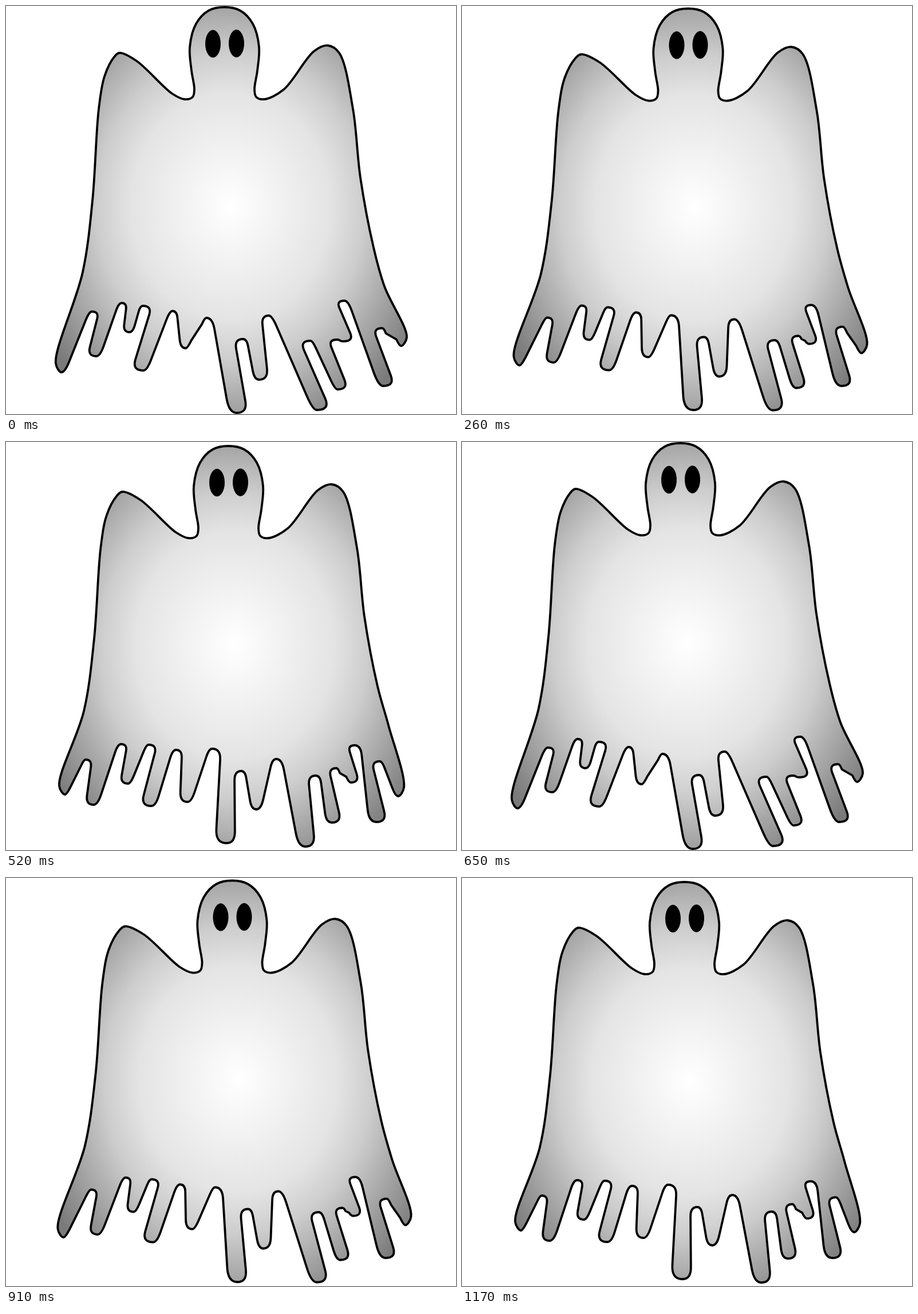
An HTML page with a canvas for the animation above (1.3 s loop, 786 by 713 pixels).

```html
<!DOCTYPE html>
<html lang="en">
<head>
<meta charset="utf-8">
<title>Ghost</title>
<style>
html, body { margin: 0; overflow: hidden; background: #fff; }
canvas { display: block; }
</style>
</head>
<body>
<canvas id="stage" width="786" height="713"></canvas>
<script>
const ctx = document.getElementById("stage").getContext("2d");
const STEP = 130, POSES = 5;
const pairs = text => text.trim().split(/\s+/).map(p => p.split(",").map(Number));

// Upper outline, clockwise; the head is mirrored about its middle
const left = pairs("134,465 151,340 162,180 172,123 189,89 198,82 228,96 290,153");
const halfHead = pairs("312,163 326,159 329,146 324,113 321,72 332,31 354,8");
const right = pairs("485,146 538,79 562,69 582,82 606,180 619,300 642,422 661,490");
const mirrored = halfHead.map(([x, y]) => [763 - x, y]).reverse();
const upper = [...left, ...halfHead, [381.5, 2], ...mirrored, ...right];
const eyes = [[361.5, 66], [402.5, 65.5]];
const core = [392, 350];

// Hem from right to left: drip tips and the gaps between them, at both ends of the sway
const hemStart = pairs(`690,594 657,563 659,664 591,515 590,586 578,583 579,670 532,585
  543,706 459,541 442,653 414,582 403,711 350,545 314,598 291,533 240,637 239,524
  216,570 202,519 158,612 150,534 97,640`);
const hemEnd = pairs(`685,619 653,558 647,664 609,530 602,595 577,570 569,665 541,583
  523,707 472,554 437,642 411,575 385,701 360,536 317,629 297,538 254,636 249,529
  213,597 201,528 153,634 139,555 103,616`);

// Bezier handle at b, pointing towards c, on a centripetal spline a-b-c
function handle(a, b, c) {
  const m = Math.hypot(b[0] - a[0], b[1] - a[1]);
  const n = Math.hypot(c[0] - b[0], c[1] - b[1]);
  const r = Math.sqrt(m * n);
  return b.map((v, k) => (m * c[k] - n * a[k] + (2 * m + 3 * r + n) * v) / (3 * (m + r)));
}

// Smooth curve through all but the first and last point, which only steer it
function spline(p) {
  ctx.moveTo(...p[1]);
  for (let i = 1; i < p.length - 2; i++) {
    ctx.bezierCurveTo(...handle(p[i - 1], p[i], p[i + 1]),
      ...handle(p[i + 2], p[i + 1], p[i]), ...p[i + 1]);
  }
}

// Where the rounded end at p meets the straight edge towards q
function shoulder(p, q, side) {
  const dy = q[1] - p[1], length = Math.abs(dy);
  const radius = (6 + 0.07 * length) * (dy < 0 ? 1 : 0.8);
  return [p[0] + side * radius, p[1] + Math.sign(dy) * Math.min(1.4 * radius, 0.4 * length)];
}

function edge(p, q) {
  const a = shoulder(p, q, -1), b = shoulder(q, p, 1);
  const xAt = y => a[0] + (b[0] - a[0]) * (y - a[1]) / (b[1] - a[1]);
  ctx.quadraticCurveTo(Math.min(xAt(p[1]), p[0] - 3), p[1], ...a);
  ctx.lineTo(...b);
  ctx.quadraticCurveTo(Math.max(xAt(q[1]), q[0] + 3), q[1], ...q);
}

function outline(top, hem) {
  const first = hem[0], last = hem[hem.length - 1];
  const beside = ([x, y], dx) => [x + dx, y - 15];
  ctx.beginPath();
  spline([beside(last, 10), last, beside(last, -10), ...top,
    beside(first, 10), first, beside(first, -10)]);
  for (let i = 1; i < hem.length; i++) edge(hem[i - 1], hem[i]);
  ctx.closePath();
}

function draw(w) {
  // The body swings out and back, held at its left tip
  const swing = 40 * w * (1 - w);
  const loose = x => Math.max(0, Math.min(1, (x - 90) / 150));
  const shift = ([x, y]) => [x + loose(x) * (7 * w + swing), y + 5 * w];
  const hem = hemStart.map(([x, y], i) => [
    x + (hemEnd[i][0] - x) * w + loose(x) * swing,
    y + (hemEnd[i][1] - y) * w]);

  ctx.fillStyle = "#fff";
  ctx.fillRect(0, 0, 786, 713);
  outline(upper.map(shift), hem);

  const glow = ctx.createRadialGradient(0, 0, 0, 0, 0, 433);
  [[0, "#fff"], [0.46, "#e4e4e4"], [0.62, "#cdcdcd"], [1, "#7a7a7a"]]
    .forEach(stop => glow.addColorStop(...stop));
  ctx.save();
  ctx.translate(...shift(core));
  ctx.scale(0.87, 1);
  ctx.fillStyle = glow;
  ctx.fill();
  ctx.restore();

  ctx.lineWidth = 3.8;
  ctx.lineJoin = "round";
  ctx.stroke();
  ctx.fillStyle = "#000";
  for (const eye of eyes) {
    ctx.beginPath();
    ctx.ellipse(...shift(eye), 13.5, 24.2, 0, 0, 7);
    ctx.fill();
  }
}

function tick() {
  const pose = Math.floor(performance.now() / STEP) % POSES;
  draw(pose / (POSES - 1));
  requestAnimationFrame(tick);
}
tick();
</script>
</body>
</html>
```
